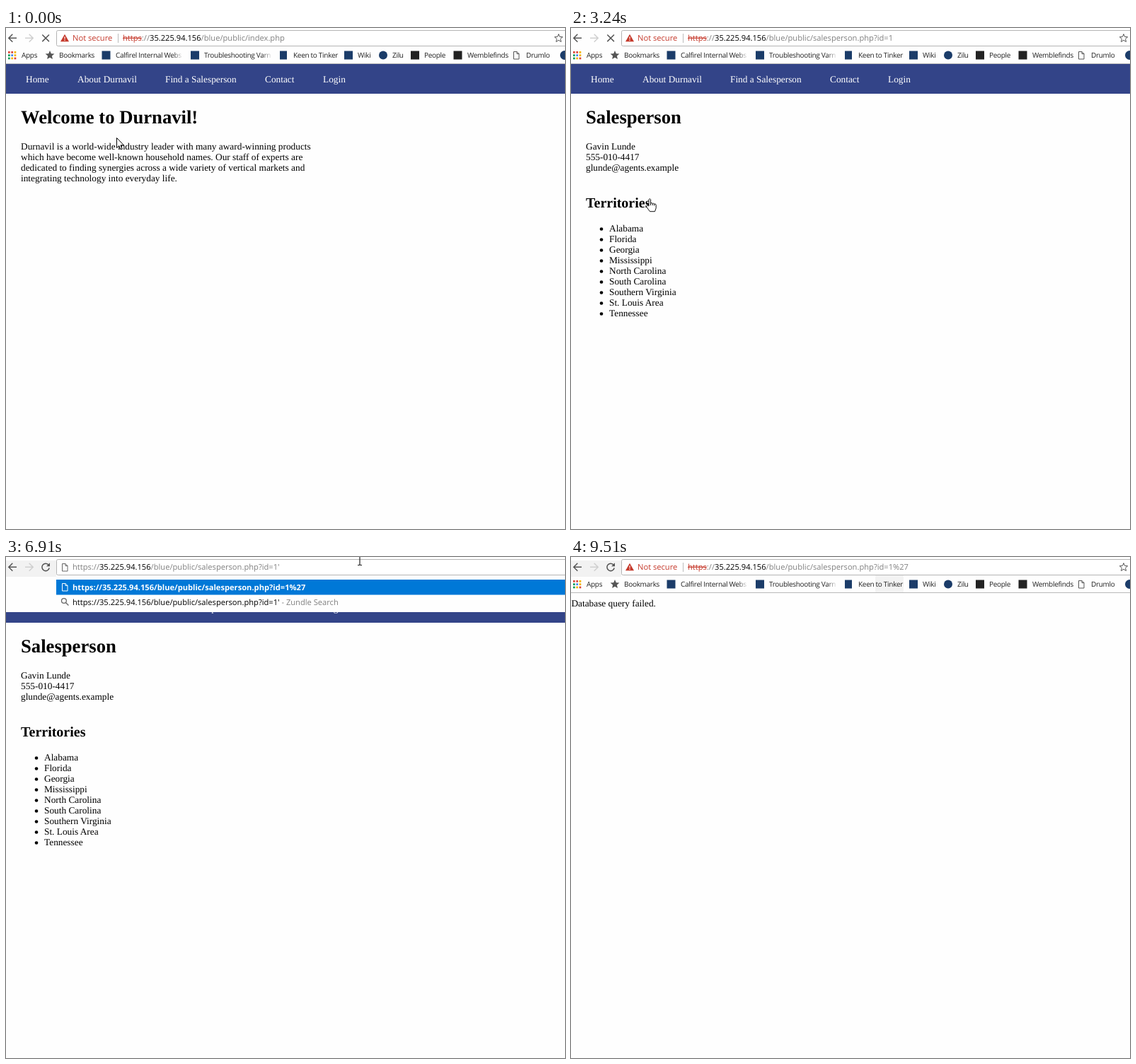
Recreate the animation shown at these times as an HTML page. Size 790 by 709 pixels, loop 9.64 s.

```html
<!DOCTYPE html>
<html lang="en">
<head>
<meta charset="utf-8">
<title>Browser session</title>
<style>
html, body { margin: 0; width: 100%; height: 100%; overflow: hidden; background: #fefefe }
svg { display: block; width: 790px; height: 709px }
text { font: 13.333px "Liberation Serif", "Times New Roman", serif; text-rendering: geometricPrecision; white-space: pre }
.h1 { font-size: 26.667px; font-weight: bold }
.h2 { font-size: 20px; font-weight: bold }
.nav { fill: #fff }
.link { fill: #00e; text-decoration: underline }
.ui { font: 11.15px "Open Sans", "Noto Sans", sans-serif }
.mark { font: 10px "Open Sans", "Noto Sans", sans-serif; letter-spacing: -.3px; fill: #222 }
.b { font-weight: bold }
.grey { fill: #808080 }
.red { fill: #c5392b }
.strike { text-decoration: line-through }
.on { fill: #fff }
</style>
</head>
<body>
<svg viewBox="0 0 790 709">
  <defs>
    <linearGradient id="fade"><stop stop-color="#fefefe" stop-opacity="0"/><stop offset="1" stop-color="#fefefe"/></linearGradient>
  </defs>
  <g id="page"></g>
  <g id="bar"></g>
  <g id="cursor"></g>
</svg>
<script>
const LOOP = 9640, BLUE = '#0078d7', INK = '#1b3c69';
const text = (x, y, s, cls = '') => `<text x="${x}" y="${Math.round(y)}" class="${cls}">${s}</text>`;
const rect = (x, y, w, h, fill, more = '') => `<rect x="${x}" y="${y}" width="${w}" height="${h}" fill="${fill}" ${more}/>`;
const dot = (x, y, r, fill) => `<circle cx="${x}" cy="${y}" r="${r}" fill="${fill}"/>`;
const line = (d, color = '#555', w = 1.5, fill = 'none') => `<path d="${d}" fill="${fill}" stroke="${color}" stroke-width="${w}"/>`;
const span = (cls, s) => `<tspan class="${cls}">${s}</tspan>`;
const lines = (x, y, list, step = 15) => list.map((s, i) => text(x, y + i * step, s)).join('');
const sheet = (x, y, color) => line(`M${x} ${y}h4.5l3 3v7.5h-7.5zM${x + 4.5} ${y}v3h3`, color, 1);
const star = (x, y, r) => 'M' + Array.from({length: 10}, (_, i) => {
  const a = i * Math.PI / 5, q = i % 2 ? r * .45 : r;
  return (x + q * Math.sin(a)).toFixed(1) + ' ' + (y - q * Math.cos(a)).toFixed(1);
}).join('L') + 'z';

// Pages
const nav = rect(0, 51, 790, 42, '#334488') +
  [[28, 'Home'], [101, 'About Durnavil'], [225, 'Find a Salesperson'], [366, 'Contact'], [448, 'Login']]
    .map(([x, s]) => text(x, 77, s, 'nav')).join('');
const site = (title, body) => nav + text(21, 135, title, 'h1') + body;

function territories() {
  const [gavin, conrad, elise, marilyn] = ['Gavin Lunde', 'Conrad Wilmery', 'Elise Farden', 'Marilyn Dobstrey'];
  const states = [
    ['Alabama (AL)', gavin], ['Alaska (AK)', conrad], ['Arizona (AZ)', elise], ['Arkansas (AR)', 'Cordelia Usken'],
    ['California (CA)', ['Northern California', conrad], ['Southern California', 'Audrey Pelviro']],
    ['Colorado (CO)', elise], ['Connecticut (CT)', marilyn], ['Delaware (DE)', marilyn],
    ['Florida (FL)', gavin], ['Georgia (GA)', gavin], ['Hawaii (HI)']
  ];
  const step = 15.1;
  let y = 228.5, out = '';
  for (const [state, ...people] of states) {
    out += text(21, y, state);
    for (const p of people) {
      const [area, name] = Array.isArray(p) ? p : ['', p];
      y += step;
      out += rect(41, Math.round(y) - 6, 4, 4, '#000');
      if (area) { out += text(54, y, area); y += step; }
      out += text(54, y, name, 'link');
    }
    y += step + 13.33;
  }
  return out;
}

const areas = ['Alabama', 'Florida', 'Georgia', 'Mississippi', 'North Carolina', 'South Carolina',
  'Southern Virginia', 'St. Louis Area', 'Tennessee'];
const pages = {
  home: site('Welcome to Durnavil!', lines(21, 172, [
    'Durnavil is a world-wide industry leader with many award-winning products',
    'which have become well-known household names. Our staff of experts are',
    'dedicated to finding synergies across a wide variety of vertical markets and',
    'integrating technology into everyday life.'])),
  list: site('Find a Salesperson',
    text(21, 172, 'Use the list below to find a salesperson nearby. We are ready to serve you!') +
    text(21, 200, 'UNITED STATES', 'b') + territories()),
  person: site('Salesperson',
    lines(21, 172, ['Gavin Lunde', '555-010-4417', 'glunde@agents.example']) +
    text(21, 254, 'Territories', 'h2') + lines(54, 288, areas) +
    areas.map((_, i) => dot(43, 284.5 + i * 15, 2.3, '#000')).join('')),
  failed: text(0.4, 70, 'Database query failed.')
};

// Browser frame
const host = '35.225.94.156', person = '/blue/public/salesperson.php?id=1';
const square = (x, fill = INK, w = 12) => rect(x, 32.5, w, 12, fill);
const gridColors = ['#db4437', '#db4437', '#f4b400', '#0f9d58', '#4285f4', '#f4b400', '#0f9d58', '#f4b400', '#db4437'];
const bookmarks =
  gridColors.map((c, i) => rect(3 + i % 3 * 4.3, 33 + (i / 3 | 0) * 4.3, 2.7, 2.7, c)).join('') +
  `<path d="${star(62, 38.7, 6.7)}" fill="#555"/>` +
  [[22, 'Apps'], [75, 'Bookmarks'], [155, 'Calfirel Internal Webs'], [280, 'Troubleshooting Varn'], [406, 'Keen to Tinker'],
    [497, 'Wiki'], [546, 'Zilu'], [591, 'People'], [652, 'Wemblefinds'], [735, 'Drumlo']]
    .map(([x, s]) => text(x, 42, s, 'mark')).join('') +
  [236, 362].map(x => rect(x, 30, 14, 17, 'url(#fade)') + rect(x + 14, 30, 9, 17, '#fefefe')).join('') +
  square(135.5) + square(261) + square(387, INK, 10) + square(478) + dot(533, 38.5, 6, INK) +
  square(572, '#222') + square(632.5, '#222') + sheet(717.5, 33.5, '#555') + dot(789.5, 38.5, 6.5, INK);

const frame = rect(71.5, 3.5, 730, 22, '#fff', 'rx="2" stroke="#b4b4b4"') +
  line('M15 14.3H4M9.3 8.8 3.8 14.3l5.5 5.5') + line('M27 14.3h11M32.7 8.8l5.5 5.5-5.5 5.5', '#cfcfcf');
const stopIcon = line('M51.3 9.5l9.6 9.6M60.9 9.5l-9.6 9.6');
const reloadIcon = line('M60.3 11.3A5.2 5.2 0 1 0 61.2 15.5') + '<path d="M62 8.3v5h-5z" fill="#555"/>';
const warning = '<path d="M83 8.7 89 19.3H77z" fill="#c5392b"/>' + line('M83 12.3v3.3M83 16.6v1.4', '#fff', 1.2) +
  text(94, 18, 'Not secure', 'ui red') + rect(158, 8, 1, 13, '#bbb');
const info = line('M88 14.4a5.1 5.1 0 1 1-10.2 0a5.1 5.1 0 1 1 10.2 0zM82.9 13.6v3.6M82.9 11.3v1.3', '#555', 1.1);
const plainUrl = (x, path) => text(x, 18, span('grey', 'https://') + host + span('grey', path), 'ui');
const badUrl = path => warning +
  text(165, 18, span('red strike', 'https') + span('grey', '://') + host + span('grey', path), 'ui');
const pickedUrl = warning + rect(165, 5, 289, 16, BLUE) +
  text(165, 18, span('on strike', 'https') + '://' + host + person, 'ui on');
const caret = x => rect(x, 5, 1, 16, '#000');

const dropdown = rect(0, 28, 790, 50, '#fefefe') + rect(71, 32, 719, 21.5, BLUE) + sheet(79.5, 37.5, '#fff') +
  text(94, 47, 'https://' + host + person + '%27', 'ui b on') +
  line('M85.3 62a3.4 3.4 0 1 1-6.8 0a3.4 3.4 0 1 1 6.8 0zM84.4 64.5l4 4', '#666', 1.3) +
  text(94, 68, 'https://' + host + person + "'" + span('grey', ' - Zundle Search'), 'ui');

const inside = (t, a, b) => t >= a && t < b;

function address(t) {
  if (t < 1550) return badUrl('/blue/public/index.php');
  if (t < 3120) return badUrl('/blue/public/territories.php');
  if (inside(t, 4750, 5465)) return pickedUrl;
  if (t < 6180) return badUrl(person) + (t >= 5650 ? caret(455) : '');
  if (t < 7750) return sheet(79.5, 9.5, '#666') + plainUrl(94, person + "'") + (t < 6910 ? caret(386) : '');
  return t < 7890 ? info + plainUrl(94, person + '%27') : badUrl(person + '%27');
}

function bar(t) {
  const loading = t < 270 || inside(t, 1550, 1670) || inside(t, 3120, 3360) || inside(t, 7750, 7890);
  const tint = inside(t, 4480, 6180) ? 46 : t >= 8670 ? 40 : 0;
  return rect(0, 0, 790, 50, '#fefefe') + rect(0, 50, 790, 1, '#b9b9b9') +
    (t >= 6180 ? rect(0, 5, 71, 23, '#f2f2f2') : '') + rect(430, 26, tint, 24, '#f3f3f3') +
    frame + (loading ? stopIcon : reloadIcon) + address(t) +
    (inside(t, 6180, 7750) ? '' : line(star(781, 14.6, 6), '#555', 1)) +
    (inside(t, 6180, 7320) ? dropdown : bookmarks);
}

// Pointer: start, end, number of steps, Bezier points
const moves = [
  [150, 630, 5, [156, 155], [240, 200], [480, 120], [289, 79]],
  [910, 1180, 3, [289, 79], [289, 77], [286, 70], [283, 67]],
  [2070, 2820, 7, [283, 67], [360, 110], [300, 240], [111, 241]],
  [3640, 4480, 7, [111, 241], [200, 150], [430, -45], [483, 14]],
  [5280, 5650, 3, [483, 14], [488, 12], [495, 7], [500, 5]],
  [8390, 9360, 8, [500, 5], [60, 60], [200, 500], [773, 708]]
];
const shapes = {
  arrow: line('M.5.5v14.2l3.3-3 2.3 5.2 2.1-.9L6 10.9h4.5z', '#000', 1, '#fff'),
  hand: line('M-1 11V1.7q1.3-2.2 2.6 0V7q1.5-1.3 2.7.5 1.5-1 2.5.6 2.2-.7 2.4 1.4v4.3L7.5 18.7H.5L-4.5 11.9q.1-2.2 2-1.6zM1.6 7v3M4.3 7.6V10M6.8 8.2v2.3', '#111', 1, '#fff'),
  beam: line('M-3-6.5h2.2L0-5.7.8-6.5H3M0-6V6M-3 6.5h2.2L0 5.7.8 6.5H3', '#222', 1.2)
};

function pointer(t) {
  if (t >= 9510) return '';
  let [x, y] = moves[0][3];
  for (const [from, to, n, ...p] of moves) {
    if (t < from) break;
    const k = Math.min(n - 1, Math.floor((t - from) / (to - from) * (n - 1) + 1e-6));
    const u = (k + 1) / n, v = 1 - u;
    [x, y] = [0, 1].map(i => Math.round(
      v ** 3 * p[0][i] + 3 * v * v * u * p[1][i] + 3 * v * u * u * p[2][i] + u ** 3 * p[3][i]));
  }
  const hand = inside(t, 1045, 2195) || inside(t, 2820, 3640);
  const kind = hand ? 'hand' : y < 26 && x > 72 ? 'beam' : 'arrow';
  return `<g transform="translate(${x} ${y})">${shapes[kind]}</g>`;
}

const shown = {};
function put(id, markup) {
  if (shown[id] !== markup) document.getElementById(id).innerHTML = shown[id] = markup;
}
function draw() {
  const t = performance.now() % LOOP;
  put('page', pages[t < 1550 ? 'home' : t < 3120 ? 'list' : t < 7750 ? 'person' : 'failed']);
  put('bar', bar(t));
  put('cursor', pointer(t));
  requestAnimationFrame(draw);
}
draw();
</script>
</body>
</html>
```
